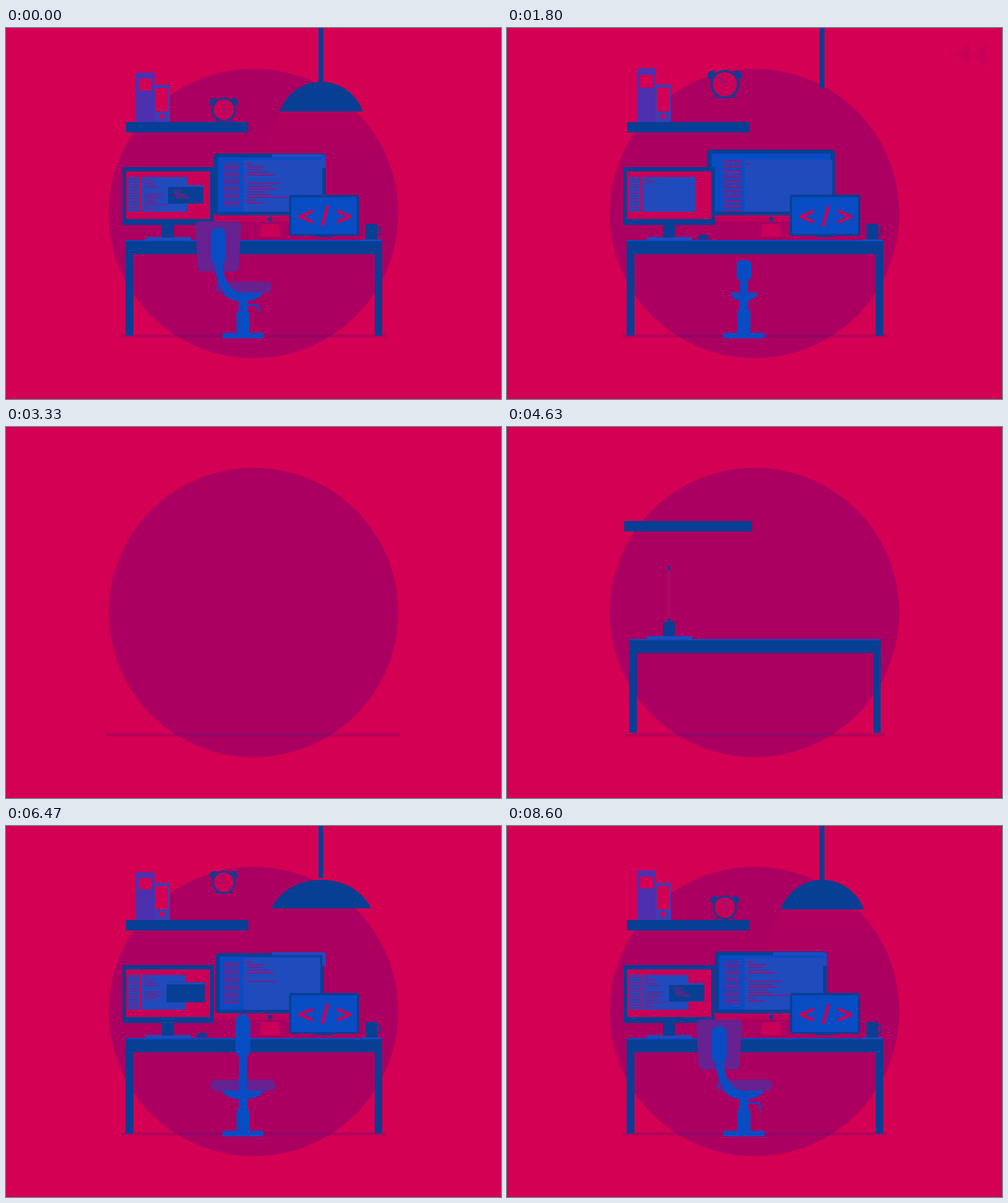
Recreate the animation shown at these times as an HTML page with a canvas. Size 800x600 px, loop 8.63 s.

```html
<!DOCTYPE html>
<html lang="en">
<head>
<meta charset="utf-8">
<title>Developer desk</title>
<style>
html, body { margin: 0; width: 100%; height: 100%; overflow: hidden; background: #d40053; }
canvas { display: block; width: 800px; height: 600px; }
</style>
</head>
<body>
<canvas id="stage" width="800" height="600"></canvas>
<script>
const ctx = document.getElementById('stage').getContext('2d');
const LOOP = 8630, REWIND = 3550, BUILD = 3600, LENGTH = LOOP - BUILD;
const BG = '#d40053', DISC = '#ab0061', TEAL = '#073f94', BLUE = '#084cc4',
  PANEL = '#1f4bbd', PURPLE = '#4d30b0', VIOLET = '#3f3cb4', PAD = '#672190',
  GLASS = '#c80057', CODE = '#85197c', FLOOR = 'rgba(90,20,120,0.28)';
let p = 0;

const clamp = x => Math.max(0, Math.min(1, x));
const ramp = (start, dur) => clamp((p - start) / dur);
const smooth = u => u * u * (3 - 2 * u);

// Elastic ease-out with half-length period
function spring(start, dur = 2000) {
  const u = ramp(start, dur);
  if (u === 0 || u === 1) return u;
  return 1 + 2 ** (-10 * u) * Math.sin((u - 0.125) * 4 * Math.PI);
}

function scaled(x, y, sx, sy, draw) {
  if (sx <= 0 || sy <= 0) return;
  ctx.save();
  ctx.translate(x, y);
  ctx.scale(sx, sy);
  ctx.translate(-x, -y);
  draw();
  ctx.restore();
}

function box(x1, y1, x2, y2, color, r = 0) {
  ctx.fillStyle = color;
  ctx.beginPath();
  ctx.roundRect(x1, y1, x2 - x1, y2 - y1, r);
  ctx.fill();
}

function disc(x, y, r, color) {
  ctx.fillStyle = color;
  ctx.beginPath();
  ctx.arc(x, y, r, 0, 7);
  ctx.fill();
}

function shape(points, color) {
  ctx.fillStyle = color;
  ctx.beginPath();
  points.forEach(([x, y]) => ctx.lineTo(x, y));
  ctx.fill();
}

function stroke(d, color, width, cap = 'round') {
  ctx.strokeStyle = color;
  ctx.lineWidth = width;
  ctx.lineCap = cap;
  ctx.lineJoin = 'round';
  ctx.stroke(new Path2D(d));
}

// Rows are [row, indent, width]; they are typed one after another
function rows(list, x, y, step, size, thick, typed, color) {
  list.forEach(([row, indent, w], i) => {
    const part = clamp(typed * list.length - i);
    if (part) box(x + indent * size, y + row * step,
      x + (indent + w * part) * size, y + row * step + thick, color);
  });
}

const SCRIPT = [[0, 0, 13], [1, 5, 29], [2, 5, 23], [3, 5, 35], [4, 5, 44],
  [5, 0, 4], [6, 0, 4], [7, 5, 54], [8, 5, 39], [9, 5, 48], [10, 5, 31],
  [11, 5, 38], [12, 5, 67], [13, 0, 18], [14, 5, 27]];
const SHELL = [[0, 0, 16], [1, 3, 8], [2, 3, 17], [3, 2, 22], [4, 6, 22]];

function shelf() {
  scaled(252, 152, 1, spring(1080), () => {
    box(240, 92, 265, 152, VIOLET);
    box(242, 97, 262, 135, BG);
    disc(252, 143, 4, BG);
  });
  scaled(225, 152, 1, spring(1860), () => {
    box(210, 72, 240, 152, PURPLE);
    box(215, 82, 236, 101, BG);
  });
  scaled(293, 152, spring(360), 1, () => box(194, 152, 391.5, 169, TEAL));
}

function hand(angle, len, width) {
  const a = angle * Math.PI / 180;
  stroke(`M0 0L${Math.sin(a) * len} ${-Math.cos(a) * len}`, PAD, width);
}

function clock() {
  const s = spring(2130, 1500);
  if (s <= 0) return;
  const fall = ramp(3340, 150);
  const after = ramp(3490, 140);
  const y = 91 + 41 * fall * fall - 20 * after * (1 - after);
  ctx.save();
  ctx.translate(352, y);
  ctx.scale(s, s);
  for (const side of [-1, 1]) {
    stroke(`M${side * 10} 14L${side * 13} 18`, TEAL, 2.5);
    ctx.save();
    ctx.rotate(side * 0.95);
    ctx.fillStyle = TEAL;
    ctx.beginPath();
    ctx.arc(0, -20, 7, Math.PI, 0);
    ctx.fill();
    ctx.restore();
  }
  disc(0, 0, 19.5, TEAL);
  disc(0, 0, 16.5, GLASS);
  const left = Math.max(0, 3600 - p);
  hand(-left, 13, 1.6);
  hand(150 + left * 0.15, 8, 1.6);
  ctx.restore();
}

function lamp() {
  const glow = ramp(3400, 200);
  if (glow) {
    const g = ctx.createLinearGradient(0, 135, 0, 215);
    g.addColorStop(0, `rgba(212,0,83,${0.2 * glow})`);
    g.addColorStop(1, 'rgba(212,0,83,0)');
    shape([[443, 135], [576, 135], [610, 215], [409, 215]], g);
  }
  scaled(509, 0, 1, spring(1900), () => box(505, 0, 513, 87, TEAL));
  scaled(509.5, 87, spring(2500, 1600), spring(2450, 900), () => {
    ctx.fillStyle = TEAL;
    ctx.beginPath();
    ctx.moveTo(442, 135);
    ctx.bezierCurveTo(454, 104, 481, 87, 509.5, 87);
    ctx.bezierCurveTo(538, 87, 565, 104, 577, 135);
    ctx.fill();
  });
}

function desk() {
  scaled(400, 498, spring(40, 1800), 1, () => box(186, 495.5, 614, 500.5, FLOOR));
  scaled(401, 343, spring(430, 1500), spring(430, 1500), () => {
    box(193.5, 343, 608, 366, TEAL);
    box(193.5, 343, 608, 345, BLUE);
    box(193.5, 360, 206, 497.5, TEAL);
    box(596, 360, 608, 497.5, TEAL);
  });
}

function leftMonitor() {
  scaled(262, 342, spring(780), 1, () => box(226, 338, 299, 343, PANEL));
  scaled(262, 343, 1, spring(720), () => box(252, 318, 271.5, 339, TEAL));
  scaled(262, 318, spring(1024), 1, () => {
    box(188.5, 225, 335.5, 318.5, TEAL, 1);
    box(194, 232, 330, 309, GLASS);
  });
  scaled(197, 241, spring(1480), 1, () => {
    box(197.5, 241, 216, 297, PANEL);
    for (let i = 0; i < 12; i++) box(200, 244 + i * 4.5, 214, 245.5 + i * 4.5, CODE);
  });
  scaled(219, 241, spring(1955), 1, () => box(219, 241, 293, 297, PANEL));
  rows(SCRIPT, 221, 244, 3.4, 0.56, 1.5, ramp(2350, 700), CODE);
  scaled(290, 269, spring(2500, 1200), spring(2500, 1200), () => {
    box(262, 254, 319, 284, TEAL);
    box(262, 254, 319, 257, PANEL);
  });
  rows(SHELL, 269, 262, 3, 1, 1.5, ramp(3570, 700), CODE);
}

function bigMonitor() {
  scaled(427, 339, 1, spring(1250), () => {
    shape([[414, 314], [440, 314], [444, 338], [410, 338]], GLASS);
    box(413, 314, 441, 317, '#950866');
    box(407, 338, 447, 340, '#a3045f');
  });
  scaled(427, 309, spring(1200), 1, () => {
    box(336, 302, 517, 313, '#bf005a', 3);
    disc(427, 309, 3.5, TEAL);
  });
  scaled(426.5, 303, spring(1930), spring(1830), () => {
    box(336, 203, 517, 303, TEAL, 5);
    box(342.5, 209, 511, 297, BLUE);
  });
  // Reflection over the upper right corner of the frame
  ctx.globalAlpha = ramp(2400, 300);
  shape([[430, 204], [514, 204], [517, 207], [517, 226], [511, 226], [511, 209], [430, 209]], PANEL);
  ctx.globalAlpha = 1;
  scaled(365, 247, spring(2135, 1500), spring(2135, 1500), () => {
    for (let i = 0; i < 16; i++) box(351.5, 219 + i * 4.5, 377, 221 + i * 4.5, CODE);
  });
  scaled(384, 253, spring(2250, 1500), 1, () => box(384, 213, 511, 297, PANEL));
  rows(SCRIPT, 385, 219, 4.5, 1, 2, ramp(2450, 800), CODE);
}

function laptop() {
  scaled(514, 336, spring(1040), spring(1080), () => {
    box(457.5, 270, 570.5, 336, TEAL, 4);
    box(461, 274, 567, 333, BLUE, 1);
    box(499, 335, 529, 338, TEAL, 1);
  });
  const s = 1 - (1 - ramp(1780, 300)) ** 3;
  scaled(515.5, 304, s, s, () => {
    stroke('M496 296L475 305L496 314', GLASS, 5, 'butt');
    stroke('M520 288L511 320', GLASS, 5, 'butt');
    stroke('M535 296L556 305L535 314', GLASS, 5, 'butt');
  });
}

function smallItems() {
  scaled(317, 342, spring(1250), spring(1250), () => {
    ctx.fillStyle = TEAL;
    ctx.beginPath();
    ctx.ellipse(317, 342, 10, 8, 0, Math.PI, 0);
    ctx.fill();
  });
  const s = 1 - (1 - ramp(1780, 300)) ** 3;
  scaled(599, 328, s, 1, () => stroke('M599 322H601Q605 322 605 328T601 335H599', TEAL, 2));
  scaled(590.5, 342, 1, spring(1080), () => box(581, 317, 600, 342, TEAL, 1));
  scaled(590.5, 342, spring(1200), 1, () => box(575, 342, 606, 344, PANEL));
}

function chair() {
  const turn = smooth(ramp(3850, 850));
  const shift = 40 * turn, x = 383 - shift;
  scaled(383, 502, spring(1080), 1, () => box(350, 493, 416, 502, BLUE));
  scaled(383, 493, 1, spring(1850), () => box(372.5, 459, 393.5, 493, BLUE));
  scaled(383, 460, 1, spring(2200, 1500), () => box(376, 438, 390, 460, BLUE));

  scaled(x, 354, spring(3400), spring(3360), () => {
    ctx.fillStyle = PAD;
    ctx.strokeStyle = PAD;
    ctx.lineWidth = 14;
    ctx.lineJoin = 'round';
    ctx.beginPath();
    ctx.moveTo(x - 30, 320);
    ctx.lineTo(x + 30, 320);
    ctx.lineTo(x + 26, 387);
    ctx.lineTo(x - 26, 387);
    ctx.closePath();
    ctx.fill();
    ctx.stroke();
  });
  scaled(383, 419, spring(2450, 1600), 1, () => box(337.5, 410, 429, 429, PAD, 9));
  scaled(383, 428, spring(2350, 1600), 1, () => {
    ctx.fillStyle = BLUE;
    ctx.beginPath();
    ctx.moveTo(350, 428);
    ctx.lineTo(416, 428);
    ctx.bezierCurveTo(404, 447, 362, 447, 350, 428);
    ctx.fill();
  });
  scaled(383, 440, 1, spring(2350), () => {
    stroke(`M${x} 365C${x} 405 ${383 - shift * 0.8} 429 383 436`, BLUE, 13, 'butt');
    box(x - 12, 323, x + 12, 384, BLUE, 12);
  });
  if (turn) scaled(390, 448, turn, turn, () =>
    stroke('M390 448H404Q409 448 409 453V459', BLUE, 3));
}

function rewindMark(t) {
  if (t >= REWIND) return;
  ctx.globalAlpha = 0.5 - 0.5 * Math.cos(2 * Math.PI * t / 830);
  for (const x of [724, 752]) shape([[x, 44], [x + 24, 24], [x + 24, 64]], DISC);
  ctx.globalAlpha = 1;
}

function frame() {
  const t = performance.now() % LOOP;
  p = t < REWIND ? LENGTH * (1 - t / REWIND) : Math.max(0, t - BUILD);
  box(0, 0, 800, 600, BG);
  disc(400, 300, 234, DISC);
  lamp();
  shelf();
  clock();
  desk();
  bigMonitor();
  leftMonitor();
  laptop();
  smallItems();
  chair();
  rewindMark(t);
  requestAnimationFrame(frame);
}
frame();
</script>
</body>
</html>
```
